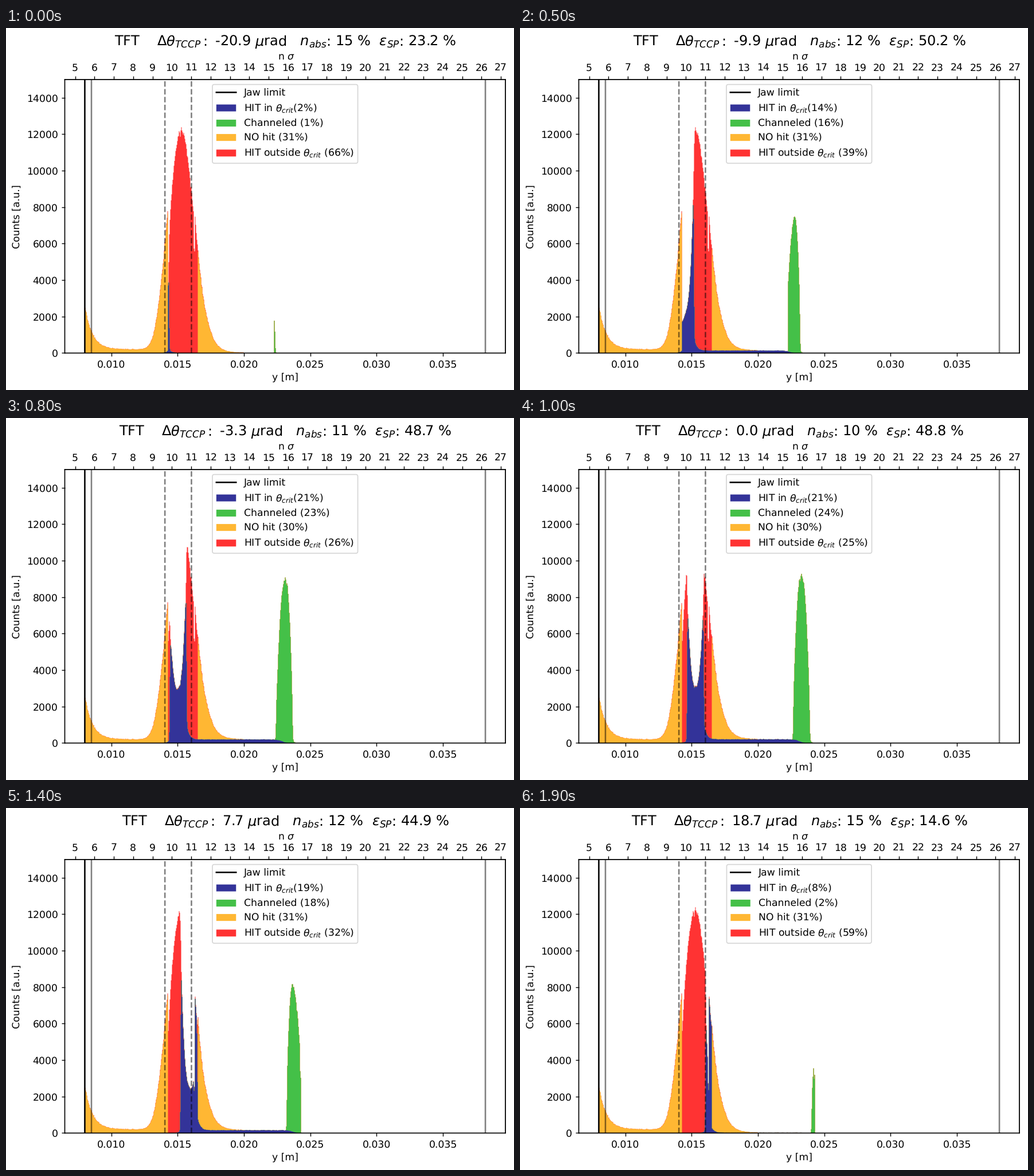
Animation, 886 px wide and 632 px high, one loop 2000 ms. Source, as a matplotlib script:

```python
import numpy as np
import matplotlib.pyplot as plt
from matplotlib.animation import FuncAnimation
from matplotlib.patches import Patch

plt.rcParams.update({"path.snap": False, "text.hinting": "none"})

W, H, DPI = 886, 632, 123.87
LEFT, RIGHT, TOP, BOTTOM = 102.5, 871, 90, 567.5
XMIN, XMAX = 0.00649, 0.03971
COLORS = BLUE, GREEN, ORANGE, RED = "#333399", "#44c048", "#ffb733", "#ff3333"

# angular scan in equal steps, with the aligned setting in the middle
scan = 2.2 * np.arange(10)
ANGLES = np.r_[-20.9 + scan, 0, 1.1 + scan[:9]]
KEYS = [-20.9, -16.5, -9.9, -3.3, 0, 7.7, 18.7]


def scanned(*values):
    return np.interp(ANGLES, KEYS, values)


absorbed = 10 + 0.25 * np.abs(ANGLES)
efficiency = scanned(23.2, 41.3, 50.2, 48.7, 48.8, 44.9, 14.6)
in_crit = scanned(2, 7, 14, 21, 21, 19, 8)
channeled = scanned(1, 5, 16, 23, 24, 18, 2)
no_hit = np.where(np.abs(ANGLES) < 7, 30, 31)

# beam profile, one bin per pixel column
PEAK, ENTRY, EXIT = 305, 283, 334
HALF, SHIFT = 14.5, 185
cols = np.arange(138, 837)


def decay(start, length):
    """Exponential that is zero before its start."""
    d = cols - start
    return np.where(d >= 0, np.exp(-np.maximum(d, 0) / length), 0)


def sigmoid(z):
    return 1 / (1 + np.exp(-np.clip(z, -50, 50)))


def beam_profile(rng):
    d = np.clip(cols - PEAK, -110, 110)
    power = np.where(d < 0, 8.2e-4 + 1.28e-7 * d**2, 9.6e-4 - 3.5e-8 * d**2)
    core = 12250 * np.exp(-power * d**2)
    core *= 1 - 0.3 * decay(ENTRY, 6) * (cols < PEAK) + 0.1 * decay(330, 6)
    core[(cols == 328) | (cols == 329)] *= 0.78
    beam = core + 2300 * decay(138, 13) + 205 * sigmoid((255 - cols) / 4)
    beam += rng.normal(0, 0.8, cols.size) * np.sqrt(beam)
    return np.where(cols < 415, np.maximum(beam, 0), 0)


rng = np.random.default_rng(4)
beam = beam_profile(rng)
ripple = rng.normal(0, 0.5, cols.size)
in_crystal = (cols >= ENTRY) & (cols <= EXIT)
hits = beam * in_crystal
halo = beam - hits
orange = np.where(cols > 240, 0.985, 1) * halo


def layers(i):
    """Blue, green, orange and red counts of step i."""
    centre = PEAK + 1 + 1.72 * ANGLES[i]
    start, end = max(centre - HALF, ENTRY), min(centre + HALF, EXIT + 1)
    share = channeled[i] / 24

    # the window splits its hits into kept (blue) and deflected (green)
    u = np.abs(cols - centre) / HALF
    window = sigmoid((1 - u) * HALF / 0.35)
    keep = np.where(cols > 329, 1, 0.255 + 0.57 * np.minimum(u, 1) ** 2.6)
    lost = hits * window * (1 - keep)
    green = np.roll(lost, SHIFT)
    if end < 327:
        green += 250 * share * decay(end + SHIFT, 2)

    # faint blue plateau reaching from the window to the green peak
    level = 205 * share * sigmoid((np.clip(centre + 181, 464, 500) - cols) / 4)
    extra = np.where(cols > end, level, 0) + 900 * np.sqrt(share) * decay(end, 4.5)
    extra += np.where(cols < start, 150 * np.exp(-np.maximum(start - cols, 0) / 4), 0)
    extra = np.maximum(extra + ripple * np.sqrt(extra), 0)
    extra = np.where(in_crystal, np.minimum(extra, 0.9 * (hits - lost)), extra)
    blue = 0.985 * hits * window * keep + extra

    red = np.maximum(hits - lost - blue, 0) * in_crystal + halo - orange
    return blue, green, orange, red


def to_data(px):
    return XMIN + (px - LEFT) / (RIGHT - LEFT) * (XMAX - XMIN)


fig = plt.figure(figsize=((W + 0.01) / DPI, (H + 0.01) / DPI), dpi=DPI)
ax = fig.add_axes([LEFT / W, 1 - BOTTOM / H, (RIGHT - LEFT) / W, (BOTTOM - TOP) / H])
ax.set(xlabel="y [m]", ylabel="Counts [a.u.]")
top = ax.twiny()
top.set(xlim=(4.466, 27.235), xticks=range(5, 28))
top.set_xlabel(r" n $\sigma$")

edges = to_data(np.r_[cols, cols[-1] + 1] - 0.5)
steps = [ax.stairs(np.zeros(cols.size), edges, fill=True, color=c, lw=0,
                   zorder=1.4 - 0.1 * k) for k, c in enumerate(COLORS)]
jaw = ax.axvline(0.008, color="k")
for x, style in [(0.0085, "-"), (0.0382, "-"), (0.01404, "--"), (0.01604, "--")]:
    ax.axvline(x, color="k", alpha=0.5, ls=style)
ax.set(xlim=(XMIN, XMAX), ylim=(0, 15000))

patches = [Patch(facecolor=c, edgecolor="none") for c in COLORS]
legend = ax.legend([jaw] + patches, ["Jaw limit", "a", "b", "c", "d"],
                   loc="upper center")
title = fig.text(487.3 / W, 1 - 31 / H, "", size=14, ha="center", va="baseline")


def draw(i):
    for step, total in zip(steps, np.cumsum(layers(i), axis=0)):
        step.set_data(values=total)
    b, g, o = (round(float(v[i])) for v in (in_crit, channeled, no_hit))
    labels = [rf"HIT in $\theta_{{crit}}$({b}%)", f"Channeled ({g}%)",
              f"NO hit ({o}%)",
              rf"HIT outside $\theta_{{crit}}$ ({100 - b - g - o}%)"]
    for text, label in zip(legend.get_texts()[1:], labels):
        text.set_text(label)
    title.set_text(
        rf"TFT    $\Delta\theta_{{TCCP}}:$ {ANGLES[i]:.1f} $\mu$rad   "
        rf"$n_{{abs}}$: {absorbed[i]:.0f} %  "
        rf"$\epsilon_{{SP}}$: {efficiency[i]:.1f} %")
    return steps


anim = FuncAnimation(fig, draw, frames=20, interval=100, repeat=True)
plt.show()
```
